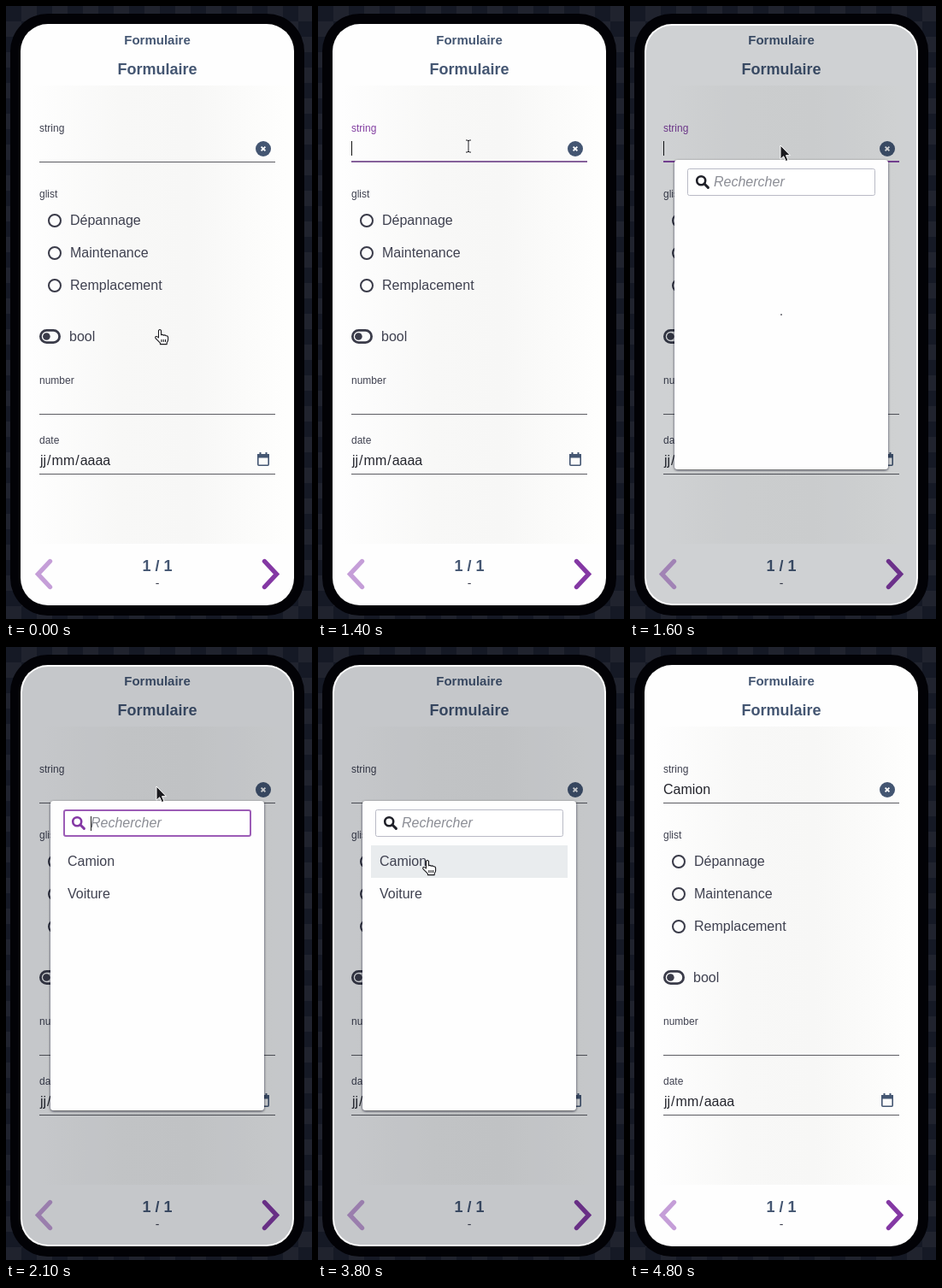
Animation of 358x717 px, one loop 5500 ms. Source, as an HTML page:

```html
<!DOCTYPE html>
<html lang="fr">
<head>
<meta charset="utf-8">
<title>Formulaire</title>
<style>
  html, body { margin: 0; width: 100%; height: 100%; overflow: hidden; background: #191c27; }
  svg { display: block; width: 100vw; height: 100vh; }
  text { font: 16px "Liberation Sans", Arial, sans-serif; fill: #3f4150; white-space: pre; }
  .title { font-weight: bold; fill: #445672; text-anchor: middle; }
  .label { font-size: 12px; }
  .line { stroke: #5c5c62; }
  .ink { fill: none; stroke: #3a3b49; }
  .cursor path { fill: #fff; stroke: #1a1a1e; stroke-linejoin: round; }
</style>
</head>
<body>
<svg viewBox="0 0 358 717" preserveAspectRatio="none">
  <defs>
    <pattern id="check" width="36" height="36" patternUnits="userSpaceOnUse">
      <rect width="36" height="36" fill="#151925"/>
      <path d="M18 0h18v18H18zM0 18h18v18H0z" fill="#20232e"/>
    </pattern>
    <linearGradient id="panel">
      <stop offset="0.03" stop-color="#fefefe"/>
      <stop offset="0.36" stop-color="#f8f8f7"/>
      <stop offset="0.62" stop-color="#f7f7f6"/>
      <stop offset="0.97" stop-color="#fefefd"/>
    </linearGradient>
    <filter id="shadow" x="-10%" y="-10%" width="120%" height="120%">
      <feDropShadow dx="0" dy="1" stdDeviation="1.8" flood-color="#14161c" flood-opacity="0.75"/>
    </filter>
  </defs>

  <rect width="358" height="717" fill="url(#check)"/>
  <rect x="5" y="9" width="344" height="704" rx="44" fill="#020206"/>
  <rect x="17" y="21" width="320" height="680" rx="32" fill="#fefefe"/>
  <rect x="17" y="93" width="320" height="536" fill="url(#panel)"/>

  <text class="title" x="177" y="45" style="font-size:15px">Formulaire</text>
  <text class="title" x="177" y="80" style="font-size:18px">Formulaire</text>

  <text class="label" id="label" x="39" y="147">string</text>
  <text id="value" x="39" y="172" style="fill:#22232b">Camion</text>
  <path class="line" d="M39 182.5H315"/>
  <path id="focusLine" d="M39 182H315" stroke="#8a48a8" stroke-width="2"/>
  <path id="caret" d="M39.5 158V175" stroke="#111"/>
  <circle cx="301" cy="167" r="9" fill="#445672"/>
  <path d="M298.6 164.6l4.8 4.8m0-4.8l-4.8 4.8" stroke="#fff" stroke-width="1.8"/>

  <text class="label" x="39" y="224">glist</text>
  <g id="options"></g>

  <rect class="ink" x="40.4" y="379.4" width="22.2" height="14.2" rx="7.1" stroke-width="2.8"/>
  <circle cx="47.4" cy="386.5" r="4.3" fill="#3a3b49"/>
  <text x="74" y="392">bool</text>

  <text class="label" x="39" y="442">number</text>
  <path class="line" d="M39 477.5H315"/>

  <text class="label" x="39" y="512">date</text>
  <text x="40" y="537" style="fill:#25262e">jj<tspan dx="1">/</tspan><tspan dx="1">mm</tspan><tspan dx="1">/</tspan><tspan dx="1">aaaa</tspan></text>
  <path class="line" d="M39 547.5H315"/>
  <g fill="#445672">
    <rect x="294.8" y="524.8" width="12.4" height="12.4" rx="1" fill="none" stroke="#445672" stroke-width="1.6"/>
    <path d="M294 524h14v4.5h-14zM296.5 522h2v3h-2zM303.5 522h2v3h-2z"/>
  </g>

  <g fill="none" stroke-width="5.4" stroke-linecap="round" stroke-linejoin="miter">
    <path d="M51.5 649.5L37.5 664.5L51.5 679.5" stroke="#c59ed8"/>
    <path d="M302.5 649.5L316.5 664.5L302.5 679.5" stroke="#8438a4"/>
  </g>
  <text class="title" x="177" y="661" style="font-size:18px">1 / 1</text>
  <text x="177" y="680" text-anchor="middle" style="font-size:14px">-</text>

  <rect id="shade" x="19" y="23" width="316" height="676" rx="30" fill="#0a141e"/>

  <g id="popup">
    <rect x="52" y="180" width="250" height="362" rx="4" fill="#fefefe" filter="url(#shadow)"/>
    <rect id="box" rx="2" fill="#fff"/>
    <g id="glass" fill="none" stroke-width="2.6">
      <circle cx="83.2" cy="204.2" r="5"/>
      <path d="M87 208L91.4 212.4" stroke-linecap="round" stroke-width="3"/>
    </g>
    <text id="hint" y="211" style="font-style:italic;fill:#8b8d95">Rechercher</text>
    <path id="searchCaret" d="M99.5 198V215" stroke="#222"/>
    <circle id="loader" cx="177" cy="361" fill="none" stroke="#33343f"/>
    <rect id="row" x="62" y="232" width="230" height="38" fill="#e9ecee"/>
    <g id="list">
      <text x="72" y="256">Camion</text>
      <text x="72" y="294">Voiture</text>
    </g>
  </g>

  <g id="cursor" class="cursor">
    <path id="hand" d="M-1.5 10V1.6Q0-.6 1.5 1.6V6.8Q3.2 5.9 4.3 7.2Q6 6.3 7 7.8Q9.2 7.2 9.6 9.6V12.6Q9.4 14.4 8.2 15.6V17.6H.4V16.2L-4.6 11.2Q-6 9.3-4.6 8.5Q-3 8.2-1.5 10ZM1.9 12V15M4.2 12V15M6.5 12V15" stroke-width="1.1"/>
    <path id="arrow" d="M0 0V16.2L3.7 12.8L6.3 18.6L9 17.4L6.5 11.7H11.4Z" style="fill:#1a1a1e;stroke:#fff"/>
    <g id="beam">
      <path d="M-3-7H-1L0-6L1-7H3M0-6V6M-3 7H-1L0 6L1 7H3" style="fill:none;stroke:#fff;stroke-width:3"/>
      <path d="M-3-7H-1L0-6L1-7H3M0-6V6M-3 7H-1L0 6L1 7H3" style="fill:none"/>
    </g>
  </g>
</svg>
<script>
const LOOP = 5500, TICK = 100;
const $ = id => document.getElementById(id);
const set = (id, attrs) => {
  for (const k in attrs) $(id).setAttribute(k, attrs[k]);
};
const show = (id, on) => { $(id).style.display = on ? "" : "none"; };
const within = (t, a, b) => t >= a && t < b;

$("options").innerHTML = ["Dépannage", "Maintenance", "Remplacement"].map((name, i) => {
  const y = 251 + 38 * i;
  return `<circle class="ink" cx="57" cy="${y}" r="7" stroke-width="2"/><text x="75" y="${y + 5}">${name}</text>`;
}).join("");

// Pointer stops: time, x, y, shape
const stops = [
  [0, 180, 378, "hand"], [400, 181, 378, "hand"],
  [600, 207, 362, "hand"], [700, 231, 325, "hand"], [800, 222, 280, "hand"],
  [900, 200, 232, "arrow"], [1000, 182, 184, "arrow"], [1100, 176, 164, "beam"],
  [1500, 176, 163, "arrow"], [2300, 177, 164, "arrow"],
  [2600, 160, 202, "beam"], [2700, 128, 233, "hand"],
  [2800, 128, 243, "hand"], [2900, 128, 249, "hand"],
  [4600, 92, 182, "arrow"], [4700, 24, 79, "arrow"], [4800, 0, 0, ""]
];

// Backdrop fades in with an ease-out, then closes at once
function shadeAt(t) {
  if (!within(t, 1500, 3900)) return 0;
  const p = Math.min(1, (t - 1400) / 400);
  return 0.23 * (1 - (1 - p) ** 2.4);
}

function draw(t) {
  t = Math.floor(t / TICK) * TICK;

  const focus = within(t, 1300, 2100);
  $("label").style.fill = focus ? "#8440a2" : "";
  show("focusLine", focus);
  set("focusLine", { stroke: t < 1500 ? "#85609a" : "#8a48a8" });
  show("caret", focus);
  show("value", t >= 3900);

  set("shade", { opacity: shadeAt(t) });
  show("popup", within(t, 1500, 3900));

  const search = within(t, 2100, 3700), w = search ? 2 : 1;
  set("box", {
    x: 67 + w / 2, y: 190 + w / 2, width: 220 - w, height: 32 - w,
    "stroke-width": w, stroke: search ? "#9c5cb6" : "#b9bac6"
  });
  set("glass", { stroke: search ? "#8438a4" : "#1f2028" });
  set("hint", { x: search ? 99 : 98 });
  show("searchCaret", within(t, 2100, 2600) || within(t, 3200, 3700));

  const grow = (t - 1600) / 200;
  show("loader", within(t, 1600, 1900));
  set("loader", {
    r: Math.max(0.5, 0.5 + 4.5 * grow),
    "stroke-width": Math.max(1, 1 + grow)
  });
  show("list", t >= 1900);
  set("list", { opacity: t < 2000 ? 0.5 : 1 });
  show("row", t >= 2700);

  const [, x, y, shape] = stops.findLast(s => s[0] <= t);
  set("cursor", { transform: `translate(${x} ${y})` });
  for (const id of ["hand", "arrow", "beam"]) show(id, id === shape);
}

const start = performance.now();
function frame() {
  draw((performance.now() - start) % LOOP);
  requestAnimationFrame(frame);
}
frame();
</script>
</body>
</html>
```
